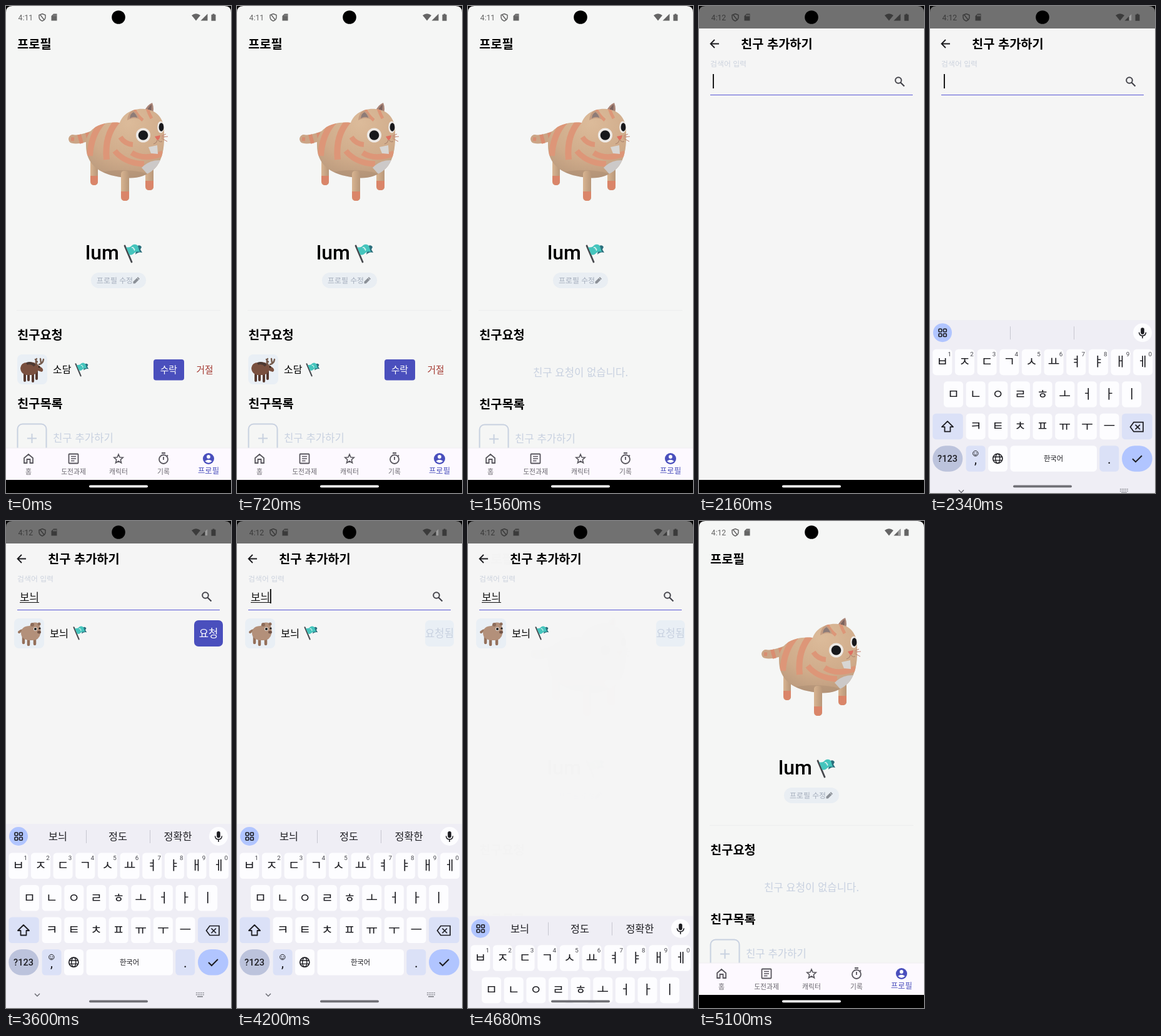
An HTML page that plays this animation: 360 px wide and 780 px high, repeating every 5160 ms.

```html
<!DOCTYPE html>
<html lang="ko">
<head>
<meta charset="utf-8">
<style>
html, body { margin: 0; width: 100%; height: 100%; overflow: hidden; background: #000; }
svg { display: block; width: 100vw; height: 100vh; }
text { font-family: "Noto Sans CJK KR", "Noto Sans CJK", sans-serif; }
.r { font-family: Roboto, sans-serif; }
</style>
</head>
<body>
<svg id="stage" viewBox="0 0 360 780"></svg>
<script>
const LOOP = 5160;
const BLUE = '#4a4fbd', PALE = '#c8d1e0', TILE = '#e9eff5', INK = '#1c1c21';
const USER = 'lum', ASKER = '소담', FRIEND = '보늬';
// Moments of the session, in ms
const ACCEPT = 1200, OPEN = 1980, KEYS_UP = 2220, TYPE = 2520, KEY_GAP = 75,
      FOUND = 3180, REQUEST = 3720, CLOSE = 4680;
const STROKES = [['ㅂ', 'ㅂ'], ['ㅗ', '보'], ['ㄴ', '본'], ['ㅡ', '보느'], ['ㅣ', FRIEND]];

const text = (x, y, s, size, fill = '#000', weight = 400, more = '') =>
  `<text x="${x}" y="${y}" font-size="${size}" fill="${fill}" font-weight="${weight}" ${more}>${s}</text>`;
const mid = (x, y, s, size, fill, weight, more = '') =>
  text(x, y, s, size, fill, weight, 'text-anchor="middle" ' + more);
const rect = (x, y, w, h, r, fill, more = '') =>
  `<rect x="${x}" y="${y}" width="${w}" height="${h}" rx="${r}" fill="${fill}" ${more}/>`;
const line = (d, color, w = 2, more = '') =>
  `<path d="${d}" fill="none" stroke="${color}" stroke-width="${w}" ${more}/>`;
const fill = (d, color) => `<path d="${d}" fill="${color}"/>`;
const dot = (x, y, r, color) => `<circle cx="${x}" cy="${y}" r="${r}" fill="${color}"/>`;
const oval = (x, y, rx, ry, color, more = '') =>
  `<ellipse cx="${x}" cy="${y}" rx="${rx}" ry="${ry}" fill="${color}" ${more}/>`;
const at = (x, y, s, body) => `<g transform="translate(${x} ${y}) scale(${s})">${body}</g>`;
const group = (id, body) => `<g id="${id}">${body}</g>`;

const flag = (x, y, s) => at(x, y, s,
  line('M2 3L13 29', '#46484d', 2.8, 'stroke-linecap="round"') +
  fill('M21 4Q26 0 29 5L27 9L30 14Q24 12 19 17Z', '#2b6f7c') +
  fill('M4 5Q10 7 14 2Q19 -1 23 3L26 13Q20 11 17 15Q13 19 9 17Z', '#45c5bd') +
  line('M13 6q4 -1 3 2q3 0 1 3', '#e4f5f3', 1.3));

const BODY = 'M128 223C127 198 150 184 182 187C187 172 204 163 222 165C242 167 253 180 253 202' +
  'C254 228 250 250 236 262C224 273 207 277 190 275C162 272 128 262 128 223Z';

function leg(x, y, w, h) {
  const foot = y + h - 15;
  return rect(x, y, w, h, 5, 'url(#leg)') +
    fill(`M${x} ${foot}h${w}v9q-1 6 -6 6h${12 - w}q-5 0 -6 -6z`, '#da8569');
}

const cat = () =>
  line('M107 213C117 215 129 211 143 205', '#cba586', 14, 'stroke-linecap="round"') +
  line('M104 213l5 .5M117 206l4 14M130 203l3 13', '#d98d71', 6) +
  leg(135, 246, 12, 41) + leg(223, 254, 13, 41) +
  fill('M221 169Q226 158 234 155Q238 165 234 175Z', '#a98578') +
  fill('M226 167Q229 160 233 158L232 172Z', '#7c625d') +
  fill(BODY, 'url(#fur)') +
  `<g clip-path="url(#body)">` +
  line('M155 185Q136 206 134 240', '#dd9678', 10) +
  line('M178 184Q157 208 161 246', '#dd9678', 10) +
  line('M174 232Q190 252 221 253', '#dd9678', 9) +
  line('M183 210Q190 221 203 222', '#dd9678', 8) +
  line('M201 235Q221 248 251 236', '#dd9678', 9) +
  line('M205 165Q210 176 219 183M226 164Q229 173 233 180', '#dd9678', 5) +
  fill('M228 226L242 223L243 237L232 236Z', '#d8d6d4') +
  fill('M217 259Q229 246 248 247L240 262L226 269Z', '#ccc9c8') +
  oval(185, 280, 55, 17, '#7f6652', 'opacity=".16"') + `</g>` +
  leg(184, 264, 13, 48) +
  fill('M194 183Q195 171 203 167Q211 170 213 181Q204 177 194 183Z', '#c59d82') +
  fill('M198 180Q199 172 204 170Q209 174 210 179Q204 176 198 180Z', '#8d7c78') +
  dot(219.5, 207, 11.5, '#eeeae6') + dot(219.5, 207, 7.8, '#17181b') +
  oval(247.5, 194, 5.3, 9.5, '#eeeae6') + oval(248.5, 194, 3.9, 6.8, '#17181b') +
  fill('M238 209L247 207Q246 214 242 215Z', '#de6f60') +
  line('M242 215Q241 220 236 221M243 215Q247 219 250 217', '#a77f6a', 1) +
  line('M249 210L259 209M249 212L258 217M249 208L256 205', '#c07f70', 1);

const moose = () => rect(18, 558, 48, 48, 8, TILE) +
  line('M30 586v14M36 588v11M43 588v13M49 585v12', '#56392f', 4, 'stroke-linecap="round"') +
  fill('M23 580Q24 570 36 571Q45 569 50 574L58 580Q61 584 57 586L51 584Q48 592 38 591Q24 592 23 580Z', '#79503f') +
  line('M33 573Q40 570 46 576', '#4c3932', 4) +
  line('M50 575Q46 570 49 565M53 574Q59 573 60 566M56 572l-1 -7M50 570l-3 -4', '#755c4e', 2.4, 'stroke-linecap="round"') +
  dot(53, 578, 1.2, '#1d1715');

const bear = () => rect(13, 156, 48, 48, 8, TILE) +
  line('M28 184v11M36 188v10M46 186v11', '#946f5a', 4.5, 'stroke-linecap="round"') +
  line('M21 178q3 -3 6 -3', '#9c7862', 4, 'stroke-linecap="round"') +
  fill('M24 179Q25 168 38 168Q42 161 50 163Q57 168 55 181Q53 191 42 191Q24 192 24 179Z', '#b3907a') +
  dot(42, 166, 3, '#8d6c5a') + dot(53, 165, 2.5, '#8d6c5a') +
  dot(47, 173, 3, '#e6e0da') + dot(47, 173, 2, '#1b1a1a') + dot(54, 172, 1.6, '#1b1a1a') +
  oval(53, 178, 3, 2.3, '#715346');

function tab(i, label, body) {
  const x = 36 + 72 * i, on = i === 4;
  return at(x, 725, 1, body) +
    mid(x, on ? 749 : 750, label, on ? 12.4 : 10.8, on ? BLUE : '#68666d', on ? 500 : 400);
}
const G = '#57555c';
const tabs = () => rect(0, 708, 360, 51, 0, '#fdf9ff') + line('M0 708H360', '#efedf1', 1) +
  tab(0, '홈', line('M-7 -1L0 -7L7 -1V7H2.5V1H-2.5V7H-7Z', G, 1.8)) +
  tab(1, '도전과제', rect(-7.5, -7.5, 15, 15, 1, 'none', `stroke="${G}" stroke-width="1.8"`) +
    line('M-4 -3.5H4M-4 0H4M-4 3.5H1.5', G, 1.6)) +
  tab(2, '캐릭터', line('M0 -7L2 -2.2L7.2 -1.8L3.3 1.7L4.5 6.8L0 4L-4.5 6.8L-3.3 1.7L-7.2 -1.8L-2 -2.2Z', G, 1.6)) +
  tab(3, '기록', `<circle cy="1" r="7" fill="none" stroke="${G}" stroke-width="1.8"/>` +
    line('M-3 -9H3M0 -3V2M5.5 -5.5l1.5 1.5', G, 1.8)) +
  tab(4, '프로필', dot(0, 0, 9, BLUE) + dot(0, -3, 2.9, '#fff') + fill('M-5.6 4Q0 -.6 5.6 4Q0 9.3 -5.6 4Z', '#fff'));

const profile = () => rect(0, 0, 360, 759, 0, '#f5f6f5') +
  text(18, 68, '프로필', 19.8, '#000', 700) + cat() +
  text(127, 406, USER, 32, '#000', 500, 'class="r"') + flag(188, 381, 1) +
  rect(136, 427, 88, 25, 12.5, '#e9eef3') + text(145, 444, '프로필 수정', 11.9, '#a3acbb') +
  at(209, 439, 1, fill('M-5.5 2.5L2 -5L5 -2L-2.5 5.5H-5.5Z', '#8b9097') + line('M.5 -3.5l3 3', '#e9eef3', .9)) +
  line('M17 487.5H343', '#eceeee', 1) +
  text(18, 534, '친구요청', 19.8, '#000', 700) +
  group('ask', moose() + text(75, 588, ASKER, 16, '#000', 500) + flag(110, 571, .74) +
    rect(236, 566, 49, 33.5, 4, BLUE, 'id="yes"') + mid(260.3, 588, '수락', 14.8, '#fff', 500) +
    mid(318, 588, '거절', 14.8, '#a53c34', 500)) +
  group('none', mid(180, 593, '친구 요청이 없습니다.', 16.7, PALE)) +
  group('list', text(18, 644, '친구목록', 19.8, '#000', 700) +
    rect(18.5, 669.5, 46, 46, 8, 'none', `stroke="${PALE}" stroke-width="2"`) +
    line('M34 692.5H49M41.5 685V700', PALE, 2) +
    text(75, 698, '친구 추가하기', 16.7, PALE, 500)) +
  tabs();

const search = () => rect(0, 0, 360, 759, 0, '#f5f5f5') + rect(0, 0, 360, 36, 0, '#707070') +
  line('M32 60.5H19M25 54L18.5 60.5L25 67', '#1a1a1e', 1.8) +
  text(67, 68, '친구 추가하기', 19.8, '#000', 700) +
  text(18, 97, '검색어 입력', 11.9, '#cdd3de') +
  text(22, 128, '', 16.8, '#111', 400, 'id="typed"') +
  rect(22, 130, 0, 1, 0, '#111', 'id="under"') + rect(22, 109, 1.8, 23, 0, '#000', 'id="caret"') +
  `<circle cx="319" cy="119" r="4.8" fill="none" stroke="#44444b" stroke-width="2"/>` +
  line('M322.5 122.5L328.5 128.5', '#44444b', 2.2) +
  line('M18 142.5H342', '#5655d6', 1.2) +
  group('hit', bear() + text(70, 186, FRIEND, 16.4, '#000', 500) + flag(107, 168, .74) +
    rect(301, 159, 46, 42, 7, BLUE, 'id="btn"') + mid(324, 186, '요청', 16.7, '#fff', 500, 'id="btnText"'));

function key(x, y, w, label, num) {
  return rect(x, y, w, 41.5, 5.5, '#fdfdff', `data-key="${label}"`) +
    mid(x + w / 2, y + 27.5, label, 20.5, INK, 500) +
    (num ? mid(x + 27, y + 11.5, num, 9.8, '#45454c', 400, 'class="r"') : '');
}
const row = (x, y, chars, nums = '') =>
  [...chars].map((c, i) => key(x + i * 35.65, y, 31, c, nums[i])).join('');

function keyboard() {
  const side = '#dbe1f7', act = '#b1c5ff';
  const globe = `<circle r="7.6" fill="none" stroke="${INK}" stroke-width="1.6"/>` +
    `<ellipse rx="3.5" ry="7.6" fill="none" stroke="${INK}" stroke-width="1.4"/>` +
    line('M-7 -2.7H7M-7 2.7H7', INK, 1.4);
  let grid = '', dots = '';
  for (const x of [-6, 1.5]) for (const y of [-6, 1.5])
    grid += rect(x, y, 4.8, 4.8, 1, 'none', `stroke="${INK}" stroke-width="1.6"`);
  for (let i = 0; i < 10; i++)
    dots += rect(304 + (i % 5) * 2.8, 755 + (i > 4) * 3, 1.5, 1.5, 0, '#777980');
  return rect(0, 485, 360, 295, 0, '#efeef5') +
    dot(20, 505, 15, act) + at(20, 505, 1, grid) +
    mid(83, 511, '', 16.3, INK, 400, 'id="hint"') +
    group('more', mid(179, 511, '정도', 16.3, INK) + mid(275, 511, '정확한', 16.3, INK)) +
    line('M128.5 495V516M230.5 495V516', '#c7c7d0', 1) +
    dot(340, 505, 15, '#fdfdff') + rect(337.2, 497, 5.6, 10.5, 2.8, INK) +
    line('M334.5 504.5Q335 510 340 510Q345 510 345.5 504.5M340 510V514', INK, 1.6) +
    row(4.3, 531.5, 'ㅂㅈㄷㄱㅅㅛㅕㅑㅐㅔ', '1234567890') +
    row(22, 583, 'ㅁㄴㅇㄹㅎㅗㅓㅏㅣ') +
    rect(4.3, 634.5, 48.5, 41.5, 5.5, side) +
    line('M28 647L37 656H32.5V663.5H23.5V656H19Z', INK, 1.8, 'stroke-linejoin="round"') +
    row(57.6, 634.5, 'ㅋㅌㅊㅍㅠㅜㅡ') +
    rect(307, 634.5, 48.7, 41.5, 5.5, side) +
    line('M326 648.5H341V663.5H326L320.5 656Z M328.5 652.5L336 660M336 652.5L328.5 660', INK, 1.7) +
    rect(4.3, 686, 48, 41.5, 20.7, '#bcc3dc') + mid(28, 712, '?123', 14.5, INK, 500, 'class="r"') +
    rect(57.6, 686, 31, 41.5, 5.5, side) + mid(73, 715, ',', 18, INK, 500, 'class="r"') +
    `<circle cx="72.8" cy="698.5" r="4.2" fill="none" stroke="${INK}"/>` +
    dot(71.2, 697.5, .7, INK) + dot(74.4, 697.5, .7, INK) + line('M70.5 699.8Q72.8 702.5 75.1 699.8', INK, 1) +
    rect(93, 686, 31, 41.5, 5.5, '#fdfdff') + at(108.3, 706.7, 1, globe) +
    rect(128.5, 686, 138.5, 41.5, 5.5, '#fdfdff') + mid(197.5, 710.5, '한국어', 11.3, INK) +
    rect(271.3, 686, 31, 41.5, 5.5, side) + mid(286.8, 715, '.', 18, INK, 500, 'class="r"') +
    rect(307, 686, 48.7, 41.5, 20.7, act) + line('M324 707L329 712L339 702', INK, 2) +
    line('M46 757L50 761L54 757', '#66676e', 1.4) +
    dots + rect(306, 761, 9, 1.5, 0, '#777980');
}

const status = () => group('status',
  '<text id="clock" class="r" x="19.5" y="22.5" font-size="12.3" fill="currentColor">4:11</text>' +
  line('M58 12.5L63 14.5V18Q63 22 58 24Q53 22 53 18V14.5ZM55 14.5L61 22', 'currentColor', 1.5) +
  fill('M76 12.5H81.5V23.5H72.5V16Z', 'currentColor') + line('M76 14v2.5M78 14v2.5M80 14v2.5', '#999', .8) +
  fill('M297 15Q304 9.5 311 15L304 23.5Z', 'currentColor') +
  fill('M322.5 12.5V23.5H311.5Z', 'currentColor') +
  '<path id="weak" d="M322.5 12.5V23.5H318.5V16.5Z" fill="#9b9b9b"/>' +
  fill('M330.5 12.5h3v1.2h2v10h-7v-10h2z', 'currentColor'));

const stage = document.getElementById('stage');
stage.innerHTML = `<defs>
  <radialGradient id="fur" cx=".55" cy=".2" r=".9"><stop stop-color="#dcbb9a"/><stop offset=".6" stop-color="#cfab8a"/><stop offset="1" stop-color="#b6967a"/></radialGradient>
  <linearGradient id="leg"><stop stop-color="#d8b491"/><stop offset="1" stop-color="#b89779"/></linearGradient>
  <clipPath id="body"><path d="${BODY}"/></clipPath></defs>` +
  rect(0, 0, 360, 780, 0, '#000') + profile() + group('search', search()) +
  rect(0, 759, 360, 21, 0, '#000') + group('keys', keyboard()) + status() +
  fill('M0 0H10Q0 0 0 10ZM360 0H350Q360 0 360 10Z', '#000') + dot(180, 18, 10.8, '#000') +
  rect(133, 767.6, 94, 3.6, 1.8, '#fff', 'id="pill"');

const el = {};
stage.querySelectorAll('[id]').forEach(n => el[n.id] = n);
const keyEls = [...stage.querySelectorAll('[data-key]')];
const show = (n, on) => n.setAttribute('visibility', on ? 'inherit' : 'hidden');
const set = (n, name, v) => n.setAttribute(name, v);
const clamp = (v, top) => v < 0 ? 0 : v > top ? top : v;
const ramp = (t, a, d) => clamp((t - a) / d, 1);
const ease = k => 1 - (1 - k) ** 3;

function draw(t) {
  const accepted = t >= ACCEPT;
  show(el.ask, !accepted);
  show(el.none, accepted);
  set(el.list, 'transform', `translate(0 ${accepted ? 1 : 0})`);
  set(el.yes, 'opacity', t >= ACCEPT - 90 ? .6 : 1);

  const page = ramp(t, OPEN, 110) * (1 - ramp(t, CLOSE, 110));
  set(el.search, 'opacity', page);
  show(el.search, page > 0);

  const up = ease(ramp(t, KEYS_UP, 200)) * (1 - ease(ramp(t, CLOSE - 30, 150)));
  set(el.keys, 'transform', `translate(0 ${295 * (1 - up)})`);
  show(el.keys, up > 0);
  set(el.pill, 'fill', up > .1 ? '#707076' : '#fff');

  const n = clamp(Math.floor((t - TYPE) / KEY_GAP) + 1, STROKES.length);
  const word = n ? STROKES[n - 1][1] : '';
  const down = n && t < TYPE + n * KEY_GAP ? STROKES[n - 1][0] : '';
  el.typed.textContent = el.hint.textContent = word;
  show(el.more, n > 2);
  keyEls.forEach(k => set(k, 'fill', k.dataset.key === down ? '#d3d5e2' : '#fdfdff'));
  const w = n ? el.typed.getComputedTextLength() : 0;
  set(el.under, 'width', w);
  set(el.caret, 'x', 22 + w);
  const last = TYPE + (STROKES.length - 1) * KEY_GAP;
  show(el.caret, page > 0 && (t < last || (t - last) % 1000 < 500));

  const asked = t >= REQUEST;
  show(el.hit, page > 0 && t >= FOUND);
  set(el.btn, 'fill', asked ? TILE : BLUE);
  set(el.btn, 'opacity', !asked && t >= REQUEST - 90 ? .6 : 1);
  el.btnText.textContent = asked ? '요청됨' : '요청';
  set(el.btnText, 'fill', asked ? PALE : '#fff');

  el.clock.textContent = t < OPEN ? '4:11' : '4:12';
  set(el.status, 'color', page > .5 ? '#3b3b3b' : '#656565');
  show(el.weak, t > 2300);
}

const start = performance.now();
function tick() {
  draw((performance.now() - start) % LOOP);
  requestAnimationFrame(tick);
}
tick();
</script>
</body>
</html>
```
